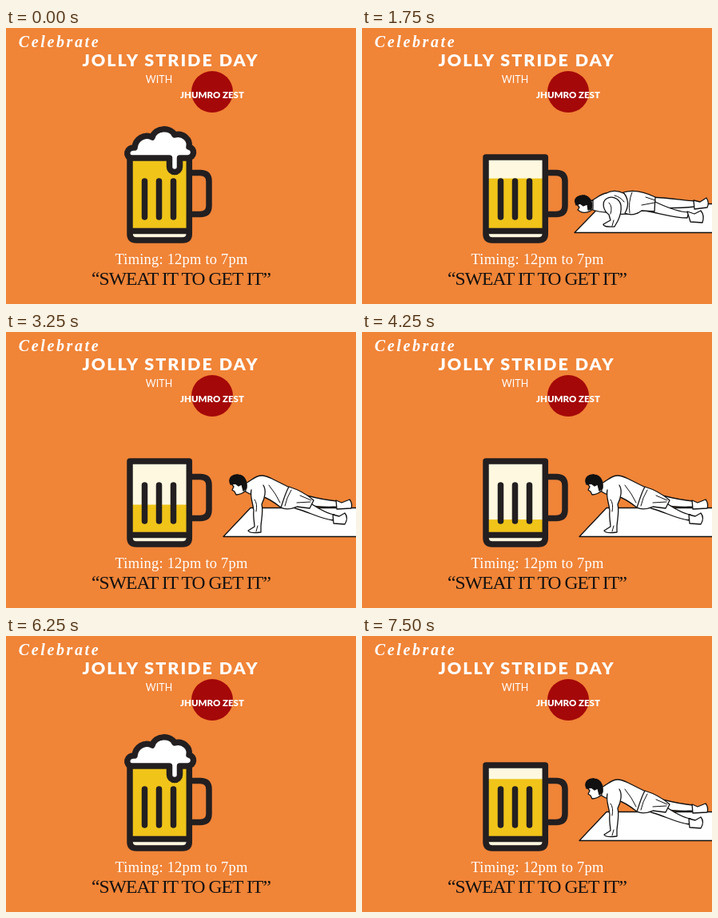
Write an HTML page that moves like this. It is 438x346 px and loops after 8 s.

```html
<!DOCTYPE html>
<html lang="en">
<head>
<meta charset="utf-8">
<style>
  html, body { margin: 0; height: 100%; overflow: hidden; background: #f08437; }
  svg { display: block; width: 438px; height: 346px; }
  text { fill: #fff; text-anchor: middle; }
  .sans { font-family: Lato, sans-serif; }
  .serif { font-family: "Liberation Serif", serif; }
  .ink { fill: none; stroke: #231f20; stroke-width: 7.5; stroke-linejoin: round; stroke-linecap: round; }
  .figure { fill: #fff; stroke: #111; stroke-width: 1.3; stroke-linejoin: round; stroke-linecap: round; }
  .figure .line { fill: none; stroke-width: 1; }
  .figure .hair { fill: #111; }
</style>
</head>
<body>
<svg viewBox="0 0 438 346">
  <rect width="438" height="346" fill="#f08437"/>

  <text x="67" y="23.500" class="serif" font-size="20" font-weight="bold" font-style="italic" letter-spacing="2.6">Celebrate</text>
  <text x="206" y="47.500" class="sans" font-size="21.5" font-weight="900" letter-spacing="2">JOLLY STRIDE DAY</text>
  <text x="191.500" y="69" class="sans" font-size="12.5">WITH</text>
  <circle cx="258" cy="80" r="26" fill="#a50808"/>
  <text x="258" y="88" class="sans" font-size="11.5" font-weight="900">JHUMRO ZEST</text>
  <text x="219.500" y="296" class="serif" font-size="18.5" letter-spacing=".2">Timing: 12pm to 7pm</text>
  <text x="219" y="322" class="serif" font-size="23.5" letter-spacing="-.9" style="fill:#111">“SWEAT IT TO GET IT”</text>

  <g id="mug">
    <path d="M155 162H229V258H155Z" fill="#fdf8df"/>
    <rect id="beer" x="157" width="70" fill="#f0c419"/>
    <path d="M155 256H229V260Q229 266 222 266H162Q155 266 155 260Z" fill="#fdf8df"/>
    <path class="ink" d="M155 162H229.300V258Q229.300 266 221 266H163Q155 266 155 258ZM156 254.500H229
      M173.500 192V237M191.500 192V237M209.500 192V237
      M230 181.500H243Q254 181.500 254 192V223Q254 233.500 243 233.500H230"/>
    <path id="foam" class="ink" style="fill:#fff" d="M157 163C149 162 150 149 161 150C162 139 173 132 183 137
      C187 124 206 124 211 134C222 131 231 140 229 149C237 151 236 162 228 163H217.500V174a6.500 6.500 0 0 1-13 0V163Z"/>
  </g>

  <g id="up" class="figure">
    <path d="M272 256.500L306 220.500H440V256.500Z"/>
    <path d="M376 205C388 208 402 211 414 212V219C400 220 388 219 374 217Z"/>
    <path d="M413 211L420 214L430 210Q434 215 432 221L414 222Z"/>
    <path d="M356 213L380 214C392 222 402 228 411 229L409 236C393 234 380 226 362 221Z"/>
    <path d="M409 229L417 231L424 227Q429 233 424 241L410 240Z"/>
    <path d="M299 190C307 187 311 180 320 180C325 180 329 182 333 184L357 196L350 218L344 220C335 213 328 208 320 206C311 206 304 203 298 199Z"/>
    <path d="M354 194C364 197 377 204 385 211L380 221L364 219C357 222 350 223 344 220C347 212 349 203 354 194Z"/>
    <path d="M307 198C305 206 309 214 310 224C309 232 311 239 311 244L303 249Q305 253 319 251L319 243C320 232 322 224 320 216C324 208 326 198 322 192"/>
    <path d="M282 190L285 194L283 198L286 200L288 204Q294 204 300 199V187Z"/>
    <path class="hair" d="M280 188C279 182 285 178 291 179C299 180 302 188 301 196L297 199L295 191L291 193L287 190L281 191Z"/>
    <path class="line" d="M311 210Q315 215 313 225M315 243L313 250M329 192Q338 203 343 214M357 198Q351 208 349 218M364 214L381 213M368 205L382 211"/>
  </g>

  <g id="down" class="figure">
    <path d="M266 256.500L301 220.500H440V256.500Z"/>
    <path d="M362 212C384 213 402 216 416 217V224C398 226 384 226 362 225Z"/>
    <path d="M415 216L423 218L431 213Q435 219 432 225L416 227Z"/>
    <path d="M350 217L367 218C386 227 398 231 409 231L407 238C390 238 372 232 354 229Z"/>
    <path d="M407 230L416 233L424 229Q429 235 426 244L411 243Z"/>
    <path d="M286 217C293 214 298 208 306 207C312 203 321 204 327 207L352 208L345 232C330 234 316 234 306 231C298 231 291 229 286 227Z"/>
    <path d="M327 206C340 202 355 206 367 212L366 230L350 229C343 234 335 235 329 232C334 224 334 214 327 206Z"/>
    <path d="M306 214C300 218 301 228 309 234L311 241L302 246Q302 250 316 249L320 242C323 236 325 230 324 222C322 213 312 210 306 214Z"/>
    <path d="M269 221L272 225L270 228L273 230Q280 234 289 227V216Z"/>
    <path class="hair" d="M267 219C265 213 272 209 279 210C286 212 289 219 287 227L283 228L282 221L277 223L273 220L268 222Z"/>
    <path class="line" d="M309 219Q314 224 311 233M315 241L313 248M316 210Q324 212 328 218M338 206Q333 218 335 232M350 222L366 219M355 212L367 216"/>
  </g>
</svg>
<script>
  const [beer, foam, up, down] = ["beer", "foam", "up", "down"].map(id => document.getElementById(id));
  const LOOP = 8000, ROUND = 6250, STEP = 500, BOTTOM = 251;
  const show = (el, on) => el.style.display = on ? "" : "none";

  // Each half-second step is one push-up move and one sip.
  function draw(now) {
    const step = Math.floor((now % LOOP % ROUND + STEP / 2) / STEP);
    const lowered = step < 10 ? step % 2 === 0 : step === 11;
    const full = step < 2;
    const sips = Math.min(step, 10) - 2;
    const level = full ? 162 : step === 12 ? BOTTOM : 170 + 9.3 * sips;

    show(foam, full);
    show(up, step > 0 && !lowered);
    show(down, step > 0 && lowered);
    beer.setAttribute("y", level);
    beer.setAttribute("height", BOTTOM - level);
  }

  const start = performance.now();
  function tick() {
    draw(performance.now() - start);
    requestAnimationFrame(tick);
  }
  tick();
</script>
</body>
</html>
```
